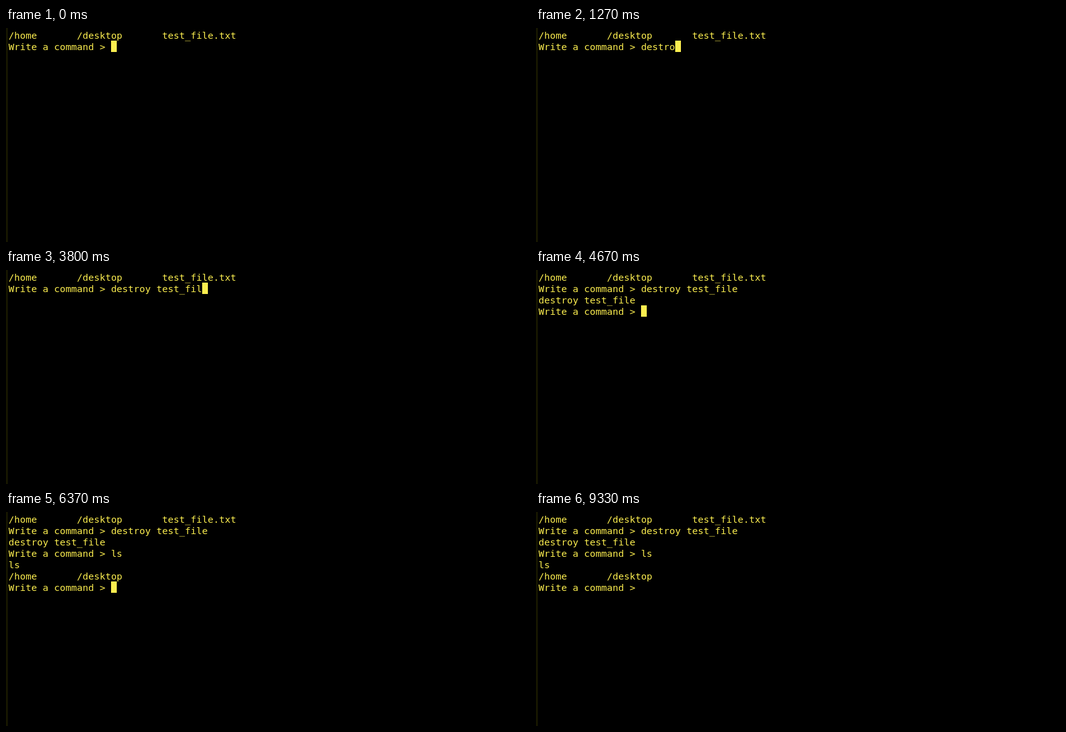
Write an HTML page that moves like this. It is 828 by 339 pixels and loops after 9710 ms.

```html
<!DOCTYPE html>
<html lang="en">
<head>
<meta charset="utf-8">
<title>Terminal</title>
<style>
  html, body { margin: 0; width: 100%; height: 100%; overflow: hidden; background: #000; }
  #edge { position: absolute; left: 0; top: 0; width: 3px; height: 100%; background: #161600; }
  #screen {
    position: absolute; left: 4px; top: 3px; margin: 0;
    font: 14.95px/18px "DejaVu Sans Mono", monospace;
    color: #fcee4f; white-space: pre;
  }
  #cursor { position: absolute; width: 9px; height: 18px; background: #fcee4f; }
</style>
</head>
<body>
<div id="edge"></div>
<pre id="screen"></pre>
<div id="cursor"></div>
<script>
const LOOP = 9710;
const CELL = { w: 9, h: 18, left: 4, top: 2 };
const PROMPT = "Write a command > ";
const FOLDER = "/home       /desktop";
const FILE = "       test_file.txt";

// Each command: key press times, the return key, and the lines it prints.
const commands = [
  {
    text: "destroy test_file",
    keys: [1070, 1110, 1150, 1190, 1230, 1270, 1300, 1700, 2130, 2200,
           2370, 2530, 3130, 3370, 3600, 3800, 3970],
    enter: 4670,
    output: ["destroy test_file"]
  },
  { text: "ls", keys: [5950, 6030], enter: 6370, output: ["ls", FOLDER] }
];

// Times at which the cursor switches between visible and hidden.
const blinks = [4530, 4670, 5270, 5870, 6930, 7530, 8130, 8730, 9330];

const screenEl = document.getElementById("screen");
const cursorEl = document.getElementById("cursor");
const countPassed = (times, t) => times.filter(time => time <= t).length;

function linesAt(t) {
  const lines = [FOLDER + FILE];
  for (const { text, keys, enter, output } of commands) {
    lines.push(PROMPT + text.slice(0, countPassed(keys, t)));
    if (t < enter) return lines;
    lines.push(...output);
  }
  lines.push(PROMPT);
  return lines;
}

function render(t) {
  const lines = linesAt(t);
  const text = lines.join("\n");
  if (screenEl.textContent !== text) screenEl.textContent = text;
  const row = lines.length - 1;
  cursorEl.style.left = CELL.left + lines[row].length * CELL.w + "px";
  cursorEl.style.top = CELL.top + row * CELL.h + "px";
  cursorEl.style.visibility = countPassed(blinks, t) % 2 ? "hidden" : "visible";
}

const start = performance.now();
function tick() {
  render((performance.now() - start) % LOOP);
  requestAnimationFrame(tick);
}
tick();
</script>
</body>
</html>
```
